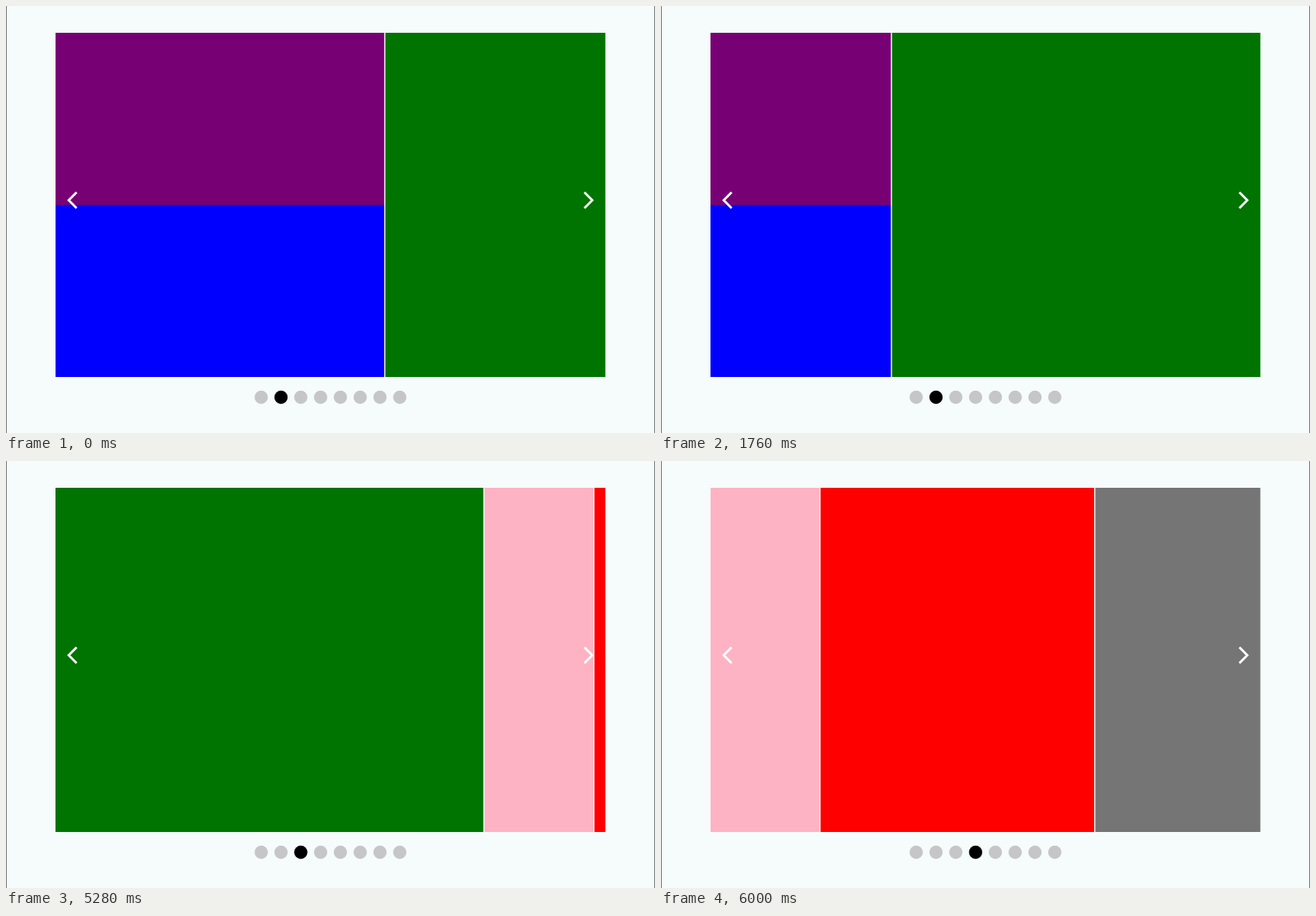
Write an HTML page that moves like this. It is 800 px wide and 526 px high and loops after 8 s.

```html
<!DOCTYPE html>
<html lang="en">
<head>
<meta charset="utf-8">
<title>Carousel</title>
<style>
  html, body { margin: 0; width: 100%; height: 100%; overflow: hidden; background: #f5fcfb; }
  svg { display: block; width: 800px; height: 526px; }
</style>
</head>
<body>
<svg viewBox="0 0 800 526">
  <clipPath id="view"><rect x="61" y="33" width="677.8" height="424"/></clipPath>
  <path d="M.5 0V526M799.5 0V526" stroke="#77797a"/>
  <g clip-path="url(#view)">
    <rect x="61" y="33" width="677.8" height="424" fill="#fff"/>
    <g id="track"></g>
  </g>
  <path d="M87 229.5 77.3 239.3 87 249M713 229.5 722.7 239.3 713 249"
    fill="none" stroke="#fff" stroke-width="2.8"/>
  <g id="dots"></g>
</svg>
<script>
const LOOP = 8000, STEP = 40, SLIDE = 250;
const COL = 135.5, GAP = 1.4;

// start column, column span, colour, top, height
const tiles = [
  [0, 3, "#770074", 33, 212],
  [0, 3, "#0000ff", 245, 212],
  [3, 4, "#007400", 33, 424],
  [7, 1, "#fdb3c3", 33, 424],
  [8, 2.5, "#ff0000", 33, 424],
  [10.5, 2.5, "#757575", 33, 424]
];

// start time, columns travelled
const slides = [[1643, 3], [5255, 4]];

const track = document.getElementById("track");
const dots = document.getElementById("dots");

function add(parent, name, attrs) {
  const el = document.createElementNS("http://www.w3.org/2000/svg", name);
  for (const key in attrs) el.setAttribute(key, attrs[key]);
  return parent.appendChild(el);
}

for (const [col, span, fill, y, height] of tiles) {
  add(track, "rect", { x: 61.1 + col * COL, y, width: span * COL - GAP, height, fill });
}
for (let i = 0; i < 8; i++) {
  add(dots, "circle", { cx: 314.6 + i * 24.4, cy: 482, r: 8.2 });
}

const ease = p => (1 - Math.cos(Math.PI * p)) / 2;

function draw(t) {
  let shift = 0, active = 1;
  for (const [start, cols] of slides) {
    const p = Math.min(1, Math.max(0, (t - start) / SLIDE));
    shift += ease(p) * cols * COL;
    if (p === 1) active++;
  }
  track.setAttribute("transform", `translate(${-shift} 0)`);
  [...dots.children].forEach((dot, i) =>
    dot.setAttribute("fill", i === active ? "#000" : "#c6c6c8"));
}

const begin = performance.now();
function tick() {
  const t = (performance.now() - begin) % LOOP;
  draw(Math.floor(t / STEP) * STEP);
  requestAnimationFrame(tick);
}
draw(0);
requestAnimationFrame(tick);
</script>
</body>
</html>
```
